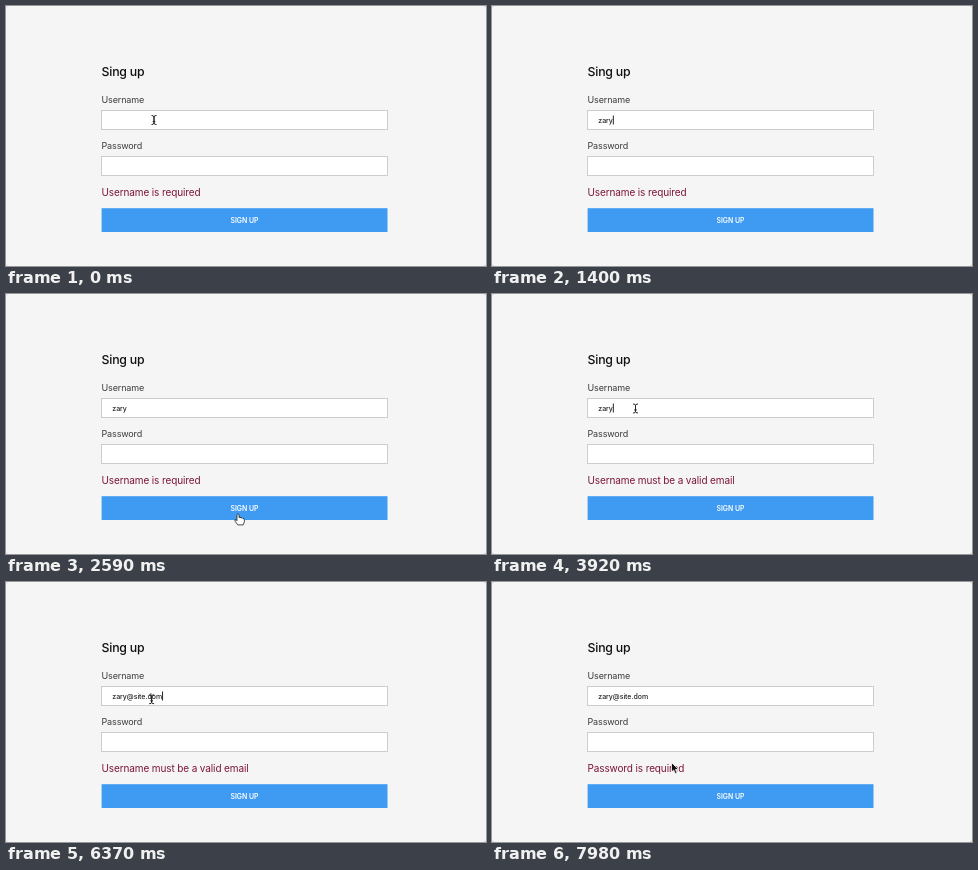
Write an HTML page that moves like this. It is 480 by 260 pixels and loops after 8000 ms.

```html
<!DOCTYPE html>
<html lang="en">
<head>
<meta charset="utf-8">
<title>Sign-up form</title>
<style>
  html, body { margin: 0; width: 100%; height: 100%; overflow: hidden; background: #f5f5f5; }
  svg { display: block; width: 480px; height: 260px; font-family: Inter, "Open Sans", sans-serif; }
  .title { font-size: 12.3px; font-weight: 500; letter-spacing: -.2px; fill: #111; }
  .label { font-size: 9px; letter-spacing: -.14px; fill: #3c3c3c; }
  .field { fill: #fff; stroke: #cdcdcd; }
  .value { font-size: 7px; font-weight: 500; letter-spacing: -.05px; fill: #222; }
  .error { font-size: 10px; letter-spacing: -.12px; fill: #7d1539; }
  .button { font-size: 6.9px; font-weight: 600; fill: #fff; text-anchor: middle; }
  .ibeam { fill: none; stroke: #222; }
  .hand, .arrow { stroke-width: .8; stroke-linejoin: round; }
  .hand { fill: #fff; stroke: #222; }
  .arrow { fill: #111; stroke: #fff; }
</style>
</head>
<body>
<svg viewBox="0 0 480 260">
  <rect width="480" height="260" fill="#d8d8d8"/>
  <rect width="480" height="260" rx="3" fill="#f5f5f5"/>
  <text class="title" x="95.5" y="70">Sing up</text>
  <text class="label" x="95.5" y="97">Username</text>
  <rect class="field" x="95.5" y="104.5" width="286" height="19"/>
  <text class="value" id="value" x="106.3" y="116.5"></text>
  <rect id="caret" y="109.5" width=".9" height="9" fill="#111"/>
  <text class="label" x="95.5" y="143">Password</text>
  <rect class="field" x="95.5" y="150.5" width="286" height="19"/>
  <text class="error" id="error" x="95.5" y="190"></text>
  <rect x="95.6" y="202.2" width="285.9" height="23.8" fill="#3f9bf1"/>
  <text class="button" x="238.5" y="216.7">SIGN UP</text>
  <g id="pointer">
    <path class="ibeam" d="M-2.5-4.5Q0-4.5 0-3V3Q0 4.5-2.5 4.5M2.5-4.5Q0-4.5 0-3V3Q0 4.5 2.5 4.5M-1.3 1.5H1.3"/>
    <path class="hand" d="M-1 1Q0 -.6 1 1V4Q2 3.2 3 4.4Q4.2 3.8 4.8 5Q6.3 4.6 6.4 6.3V8.4L5.2 11.4H-.2L-3 7.6Q-3.6 5.9 -2 6.2L-1 7.2Z"/>
    <path class="arrow" d="M0 0V9.6L2.2 7.6L3.8 11.2L5.5 10.4L4 7H7Z"/>
  </g>
</svg>
<script>
const LOOP = 8000, STEP = 70, BLINK = 455;
const errors = ["Username is required", "Username must be a valid email", "Password is required"];
const clicks = [2590, 7280], focuses = [420, 3850];
const bursts = [
  { from: 1050, to: 1330, text: "zary" },
  { from: 4760, to: 5180, text: "@site" },
  { from: 5810, to: 6090, text: ".dom" }
];
const home = { x: 148, y: 114 };
const moves = [
  { from: 1470, to: 2240, x: 232, y: 219.5 },
  { from: 3150, to: 3850, x: 143.5, y: 114.5 },
  { from: 6300, to: 7000, x: 220, y: 213 },
  { from: 7840, to: 7980, x: 179.5, y: 180.5 }
];

const get = id => document.getElementById(id);
const value = get("value"), caret = get("caret"), error = get("error"), pointer = get("pointer");
const show = (node, on) => node.setAttribute("visibility", on ? "visible" : "hidden");
const clamp = k => Math.max(0, Math.min(1, k));
const progress = (t, { from, to }) => clamp((t - from) / (to - from));
const latest = (t, times) => Math.max(-1, ...times.filter(s => s <= t));
const starts = list => list.map(item => item.from);

function typed(t, burst) {
  if (t < burst.from) return "";
  return burst.text.slice(0, 1 + Math.floor(progress(t, burst) * (burst.text.length - 1)));
}

// The caret stays lit while typing, then blinks until a click takes the focus away.
function caretLit(t) {
  const active = latest(t, [...focuses, ...bursts.flatMap(b => [Math.min(t, b.to)].filter(s => s >= b.from))]);
  return active > latest(t, clicks) && Math.floor((t - active) / BLINK) % 2 === 0;
}

function pointerAt(t) {
  return moves.reduce((p, move) => {
    const k = progress(t, move), ease = k * k * (3 - 2 * k);
    return { x: p.x + (move.x - p.x) * ease, y: p.y + (move.y - p.y) * ease };
  }, home);
}

function shapeAt(y) {
  if (y >= 202 && y < 226) return 1;
  return y >= 104 && y < 124 || y >= 150 && y < 170 ? 0 : 2;
}

function draw(time) {
  const t = Math.floor(time % LOOP / STEP) * STEP;
  value.textContent = bursts.map(b => typed(t, b)).join("");
  error.textContent = errors[clicks.filter(c => c + STEP <= t).length];
  caret.setAttribute("x", 106.3 + value.getComputedTextLength());
  show(caret, caretLit(t));

  // Typing hides the pointer until it moves again.
  const { x, y } = pointerAt(t), shape = shapeAt(y);
  const visible = latest(t, starts(moves)) >= latest(t, starts(bursts));
  pointer.setAttribute("transform", `translate(${x} ${y})`);
  [...pointer.children].forEach((node, i) => show(node, visible && i === shape));
}

const start = performance.now();
function tick() {
  draw(performance.now() - start);
  requestAnimationFrame(tick);
}
tick();
</script>
</body>
</html>
```
